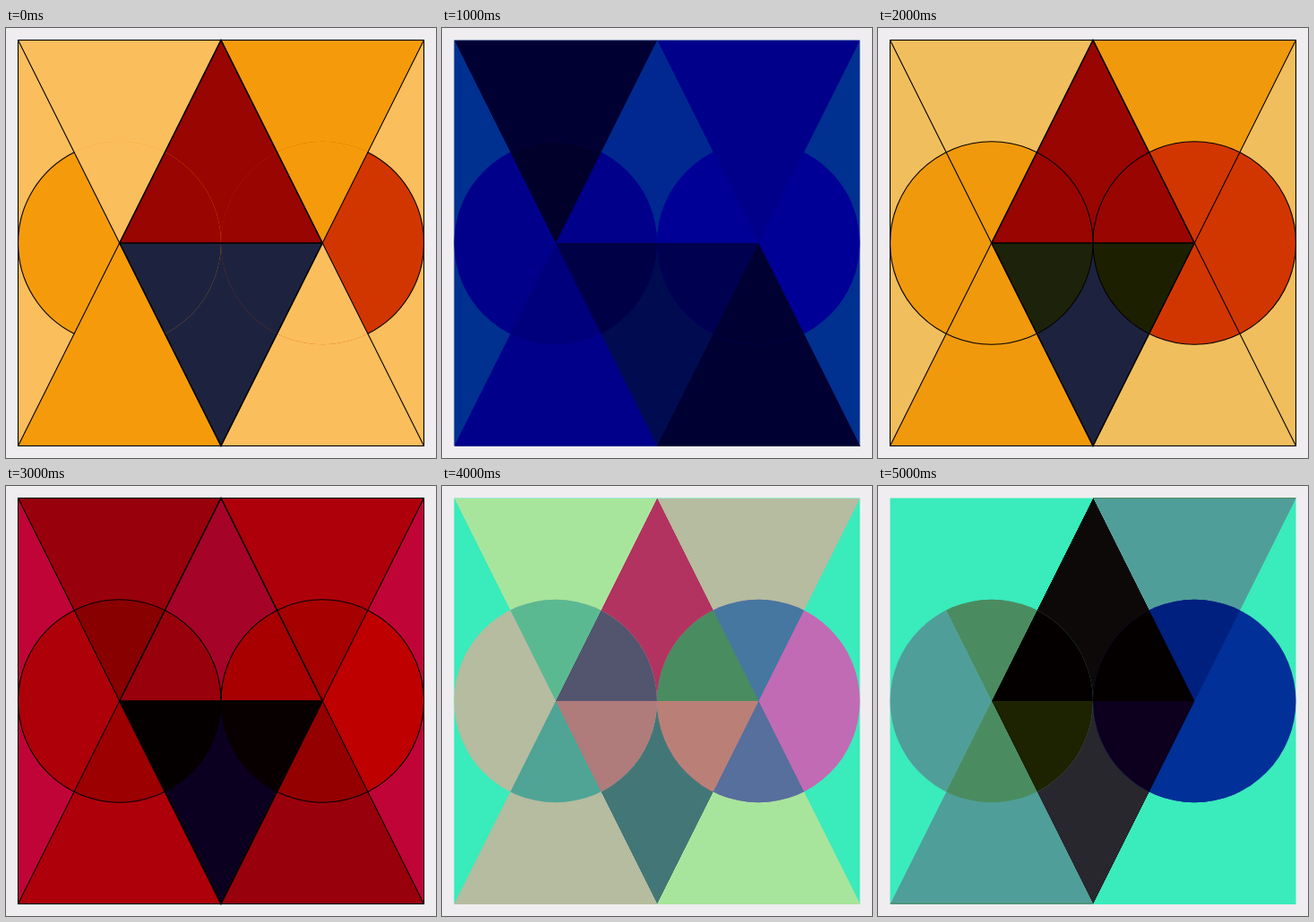
An HTML page that plays this animation: 480 px wide and 480 px high, repeating every 5.99 s.

```html
<!DOCTYPE html>
<html lang="en">
<head>
<meta charset="utf-8">
<title>Colour blend geometry</title>
<style>
  html, body { margin: 0; width: 100%; height: 100%; overflow: hidden; background: #efedef; }
  svg { display: block; width: 100vw; height: 100vh; }
</style>
</head>
<body>
<svg id="stage" viewBox="0 0 480 480"></svg>
<script>
const LOOP = 5990, STEP = 1000;
const LOW = 13.5, MID = 240, HIGH = 466.5, R = 113.25;
const LEFT = MID - R, RIGHT = MID + R;

const triangles = {
  topLeft: `M${LOW} ${LOW}H${MID}L${LEFT} ${MID}Z`,
  topRight: `M${MID} ${LOW}H${HIGH}L${RIGHT} ${MID}Z`,
  bottomLeft: `M${LOW} ${HIGH}H${MID}L${LEFT} ${MID}Z`,
  bottomRight: `M${MID} ${HIGH}H${HIGH}L${RIGHT} ${MID}Z`,
  up: `M${LEFT} ${MID}H${RIGHT}L${MID} ${LOW}Z`,
  down: `M${LEFT} ${MID}H${RIGHT}L${MID} ${HIGH}Z`
};
const names = Object.keys(triangles);
const leftNames = ['topLeft', 'bottomLeft', 'up', 'down'];
const rightNames = ['topRight', 'bottomRight', 'up', 'down'];

// Colours of each layer: ground first, then its triangles.
const scenes = [
  { lines: 'arcs',
    square: 'fbbe5d fbbe5d f59b0b f59b0b fbbe5d 990500 1d233f',
    left: 'f59b0b fbbe5d f59b0b 990500 1d233f',
    right: 'd23600 f59b0b fbbe5d 990500 1d233f' },
  { lines: 'none',
    square: '003090 000033 00008a 00008a 000033 002890 000b50',
    left: '00008a 00002b 00007c 00008a 000046',
    right: '000096 00008a 000033 000096 000050' },
  { lines: 'circles',
    square: 'f0be5d f0be5d f0990c f0990c f0be5d 990500 1d233f',
    left: 'f0990c f0990c f0990c 990500 1d230a',
    right: 'd23600 d23600 d23600 990500 1d2000' },
  { lines: 'circles',
    square: 'c00438 98000b ae000a ae000a 98000b a60329 0b0020',
    left: 'ae0009 880000 9c0000 98000b 050000',
    right: 'be0000 a60000 940000 a80000 080000' },
  { lines: 'none',
    square: '3aebbb a8e59c b5bc9f b5bc9f a8e59c b33360 437777',
    left: 'b5bc9f 5bb991 4fa495 53546e af7b7b',
    right: 'c16bb4 4677a0 566f9d 498c60 ba8078' },
  { lines: 'edges',
    square: '3aebbb 3aebbb 509e99 509e99 3aebbb 0d0908 28272d',
    left: '509e99 4a8c60 4a8c60 050000 1d2200',
    right: '003098 00207f 003098 050000 0d001e' }
];

const stage = document.getElementById('stage');

function add(parent, tag, attrs) {
  const node = document.createElementNS('http://www.w3.org/2000/svg', tag);
  for (const key in attrs) node.setAttribute(key, attrs[key]);
  return parent.appendChild(node);
}

function addTriangles(parent, list) {
  return list.map(name => add(parent, 'path', { d: triangles[name], 'shape-rendering': 'crispEdges' }));
}

function addDisc(id, cx, list) {
  const disc = { cx, cy: MID, r: R };
  add(add(stage, 'clipPath', { id }), 'circle', disc);
  const ground = add(stage, 'circle', disc);
  const group = add(stage, 'g', { 'clip-path': `url(#${id})` });
  return [ground, ...addTriangles(group, list)];
}

const box = { x: LOW, y: LOW, width: HIGH - LOW, height: HIGH - LOW };
const layers = {
  square: [add(stage, 'rect', box), ...addTriangles(stage, names)],
  left: addDisc('leftDisc', LEFT, leftNames),
  right: addDisc('rightDisc', RIGHT, rightNames)
};

const ink = add(stage, 'g', { fill: 'none', stroke: '#000', 'stroke-width': 1.1 });
add(ink, 'rect', box);
add(ink, 'path', { d: `M${LOW} ${LOW}L${MID} ${HIGH}L${HIGH} ${LOW}M${LOW} ${HIGH}L${MID} ${LOW}L${HIGH} ${HIGH}` });
add(ink, 'path', { d: triangles.up + triangles.down, 'stroke-width': 1.4 });

const circles = add(ink, 'g', {});
for (const cx of [LEFT, RIGHT]) add(circles, 'circle', { cx, cy: MID, r: R });

// Outer arcs end where the diagonals cross the circles.
const dx = R / Math.sqrt(5), dy = 2 * dx;
const sideArc = (x, sweep) => `M${x} ${MID - dy}A${R} ${R} 0 0 ${sweep} ${x} ${MID + dy}`;
const arcs = add(ink, 'path', { d: sideArc(LEFT - dx, 0) + sideArc(RIGHT + dx, 1) });

const edges = add(stage, 'path', { d: `M${MID} ${LOW}H${HIGH}M${LOW} ${HIGH - 0.5}H${MID}`, stroke: '#4a8c60' });

const show = (node, on) => node.setAttribute('display', on ? 'inline' : 'none');

function render(time) {
  const scene = scenes[Math.floor((time % LOOP) / STEP)];
  for (const key in layers) {
    scene[key].split(' ').forEach((hex, i) => layers[key][i].setAttribute('fill', '#' + hex));
  }
  show(ink, scene.lines === 'arcs' || scene.lines === 'circles');
  show(circles, scene.lines === 'circles');
  show(arcs, scene.lines === 'arcs');
  show(edges, scene.lines === 'edges');
}

const start = performance.now();
function tick() {
  render(performance.now() - start);
  requestAnimationFrame(tick);
}
tick();
</script>
</body>
</html>
```
